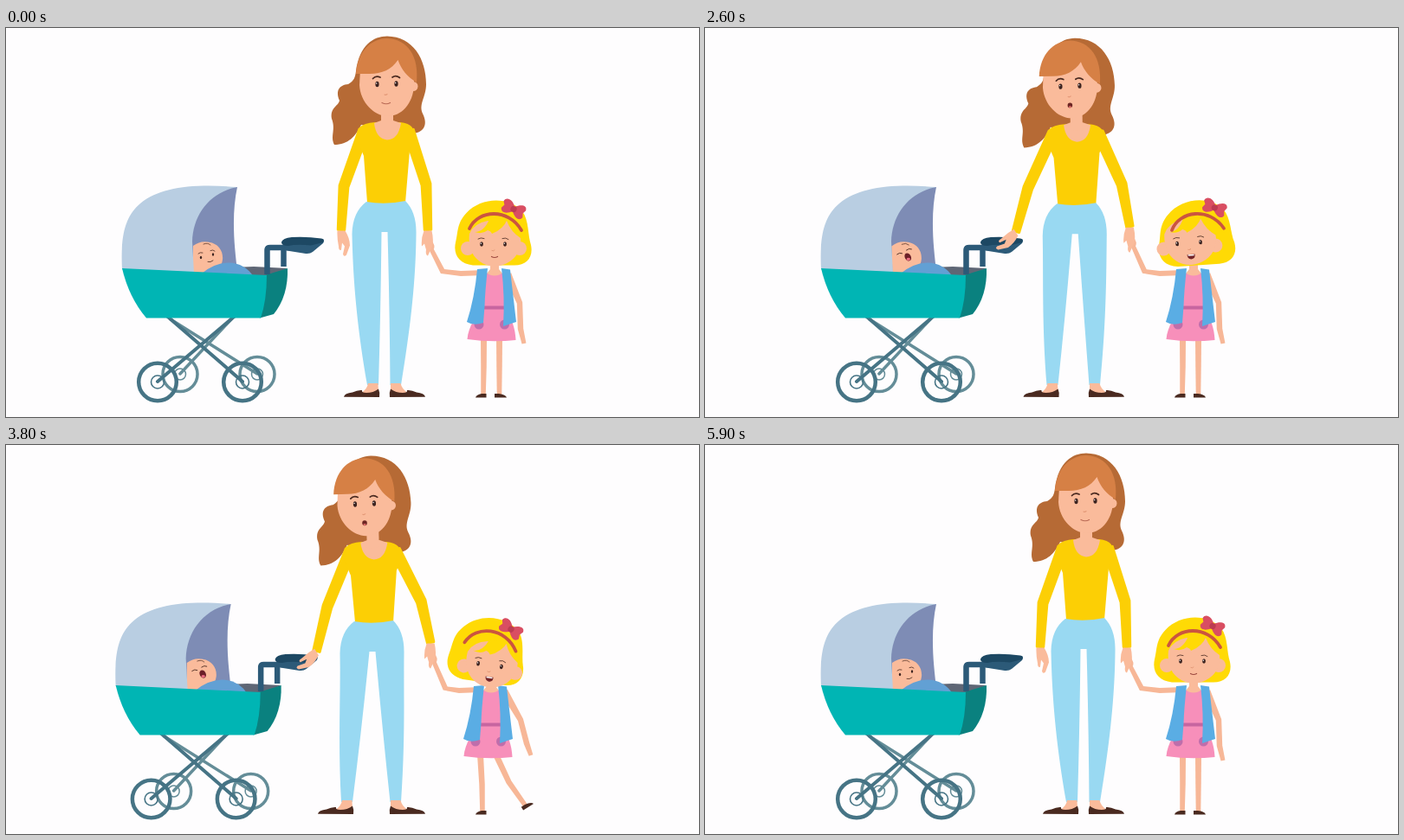
An HTML page for the animation above (6 s loop, 800x450 px).

```html
<!DOCTYPE html>
<html lang="en">
<head>
<meta charset="utf-8">
<title>Mother with pram and daughter</title>
<style>
html, body { margin: 0; width: 100%; height: 100%; overflow: hidden; background: #fefdfe; }
svg { display: block; width: 100%; height: 100%; }
.line { fill: none; stroke-linecap: round; stroke-linejoin: round; }
.skin { fill: #fabb9b; }
.shirt { fill: #fccf05; }
.sleeve { fill: #fccf05; stroke: #fccf05; stroke-width: 3; stroke-linejoin: round; }
.denim { fill: #99d9f2; }
.blonde { fill: #ffda05; }
.shoe { fill: #4a2a20; }
.ink { fill: #3b2320; }
.pen { stroke: #4a2a20; }
.steel { stroke: #467485; }
.far { stroke: #648d98; }
</style>
</head>
<body>
<svg viewBox="0 0 800 450" preserveAspectRatio="xMidYMid meet">
  <rect width="800" height="450" fill="#fefdfe"/>

  <g id="pram">
    <g class="line far" stroke-width="3.5">
      <path d="M190 337L290 400M260 337L201 400"/>
      <circle cx="201" cy="400.500" r="20"/><circle cx="290" cy="400.500" r="20"/>
      <g stroke-width="1.500"><circle cx="201" cy="400.500" r="6.500"/><circle cx="290" cy="400.500" r="6.500"/></g>
    </g>
    <g class="line steel" stroke-width="4">
      <path d="M181 329L273 409M269 329L175 409"/>
      <circle cx="175" cy="409.500" r="21.800" stroke-width="4.500"/><circle cx="273" cy="409.500" r="21.800" stroke-width="4.500"/>
      <g stroke-width="1.600"><circle cx="175" cy="409.500" r="7.500"/><circle cx="273" cy="409.500" r="7.500"/></g>
    </g>
    <path fill="#7e8cb5" d="M267 184C261 212 262 245 268 288H212V215Q230 184 267 184Z"/>
    <path fill="#5e6675" d="M262 277L286 276L325 278L301 288H262Z"/>
    <g id="baby">
      <path class="skin" d="M216 252Q224 246 233 247.500C246 249 251 259 250 268C249 277 242 284 230 284H216Z"/>
      <path class="line pen" stroke-width=".7" d="M228 250Q233 248 236 251"/>
      <g id="calm">
        <ellipse class="ink" cx="225" cy="265.500" rx="1.200" ry="1.800"/>
        <ellipse class="ink" cx="239" cy="262" rx="1.200" ry="1.800"/>
        <path class="line pen" stroke-width=".8" d="M222 261Q224 259 227 260M236 257.500Q239 256 241 258M233 270.500Q236 271.500 239 269"/>
      </g>
      <g id="cry">
        <path class="line pen" stroke-width=".9" d="M222 261.500Q225 259 228 260.500M233 257Q236 254.500 239 256"/>
        <ellipse cx="234.500" cy="265" rx="3.500" ry="4.800" fill="#6c1f27" transform="rotate(-28 234.500 265)"/>
        <ellipse cx="235" cy="267.500" rx="2.200" ry="1.600" fill="#ed6d83"/>
      </g>
    </g>
    <path fill="#62a0d4" d="M226 284Q240 272 257 271.500Q276 272 286 288H226Z"/>
    <path fill="#b9cee2" d="M134 279C132 238 138 218 155 203C178 184 216 180 267 184C235 190 216 216 215 247L217 284Z"/>
    <path fill="#0a817f" d="M299 286L325 278Q326 310 309 331L293 335.500Z"/>
    <path fill="#00b5b4" d="M134 278L301 286Q301 315 294 335.500H162Q142 312 134 278Z"/>
    <g class="line" stroke="#2c5a78" stroke-width="6.500" style="stroke-linecap: butt">
      <path d="M320.500 276V254"/>
      <path d="M301.500 285V257Q301.500 254 305 254H327"/>
    </g>
    <path fill="#2c5a78" d="M318 247L366 244Q368 246 366 249L354 259Q351 261.500 346 261L324 257.500Z"/>
    <path fill="#1d4863" d="M318 248Q319 243 330 242Q347 241 364 243.500Q368 244 366 248L352 251.500Q335 250 326 252Q318 252 318 248Z"/>
  </g>

  <g id="mum">
    <g id="backHair"><path fill="#b66a35" d="M404 50C408 20 424 9.500 440 9.500C470 10 485 36 485 65C485 80 476 88 481 99C488 113 481 121 470 122L410 112C404 125 395 135 379 135C374 125 381 118 376 105C374 92 383 91 385 84C380 72 385 66 395 65C402 61 403 57 404 50Z"/></g>
    <path class="sleeve" id="armL"/>
    <path class="sleeve" id="armR"/>
    <g id="torso">
      <path class="shirt" d="M426 109Q413 110 408 115L405 128L413 148L417 202Q438 206 461 202L466 142L473 127L469 115Q465 110 455 109Z"/>
      <path class="skin" d="M425 110L433 107H447L456 110Q453 129 440 129.500Q427 128 425 110Z"/>
    </g>
    <path class="denim" id="legs"/>
    <g id="footL">
      <path class="skin" d="M418 411H429.500L430 422H410Q417 418 418 411Z"/>
      <path class="shoe" d="M390 426.800Q391 422.500 400 421.500Q406 418.500 411 419Q410 422 416 422Q424 422 430 417.500Q432 422 431 427Z"/>
    </g>
    <g>
      <path class="skin" d="M444 411H455.500Q457 418 464 422H444Z"/>
      <path class="shoe" d="M484 426.800Q483 422.500 474 421.500Q468 418.500 463 419Q464 422 458 422Q450 422 444 417.500Q442 422 443 427Z"/>
    </g>
    <g id="head">
      <path class="skin" d="M433 90H447V116H433Z"/>
      <g id="turn">
        <circle class="skin" cx="470" cy="67.500" r="5.500"/>
        <path class="skin" d="M409 48L440 34H468L471 60V66C470 88 456 102 441 102C425 102 409 86 408 66Z"/>
        <path fill="#d68045" d="M404 53C406 27 421 12.500 440 12C464 13 477 33 474 63C464 57 456 48 452.500 37C445 48 434 53 420 53Z"/>
        <path class="line pen" stroke-width="1.700" d="M423.500 58.500Q427 54.500 432 57M446 57Q450 54 454.500 57.500"/>
        <g id="eyes">
          <ellipse class="ink" cx="428.500" cy="65" rx="2.100" ry="3.200"/><ellipse class="ink" cx="450.500" cy="64.500" rx="2.100" ry="3.200"/>
          <circle cx="427.700" cy="64" r=".7" fill="#fff"/><circle cx="449.700" cy="63.500" r=".7" fill="#fff"/>
        </g>
        <path id="lids" class="line pen" stroke-width="1.200" d="M425.500 67Q428.500 69.500 431.500 67M447.500 66.500Q450.500 69 453.500 66.500"/>
        <path class="line" stroke="#e39978" stroke-width="1.100" d="M437 77Q438.500 78 440 76.500"/>
        <path id="smile" class="line" stroke="#b96a55" stroke-width="1.200" d="M434 86.500Q439 89 443.500 86.500"/>
        <g id="gasp"><ellipse cx="439" cy="87" rx="2.800" ry="2.900" fill="#6c2523"/><ellipse cx="439" cy="88.800" rx="1.700" ry="1" fill="#dd6a69"/></g>
      </g>
    </g>
  </g>

  <g id="girl">
    <g fill="#f7b797">
      <path id="kidArmL"/><path id="kidArmR"/>
      <path id="kidLegL"/><path id="kidLegR"/>
      <path id="kidHand" d="M-3 -2L3 -2L4 6Q3 11 0 10L-3 6L-6 5Z"/>
    </g>
    <path class="shoe" d="M542 427.500Q543 424 549 423H554.500V427.500Z"/>
    <g id="kidShoe"><path class="shoe" d="M-5 4.500V0H0Q8 1 9 4.500Z"/></g>
    <g id="frock">
      <path class="skin" d="M559 268H569V279L573 284Q564 293 555 284L559 279Z"/>
      <path fill="#f78fba" d="M553 282Q564 291 575 282L575 323C584 335 588 348 588.500 361Q560 364 532.500 360C534 345 542 334 551 323Z"/>
      <path fill="#c765a0" d="M550 321.500H575V325.500H550Z"/>
      <g fill="#bf6eab"><circle cx="546" cy="343" r="5.500"/><circle cx="575.500" cy="343" r="5.500"/></g>
      <path fill="#5aade4" d="M544 279L556 278Q553 305 552.500 322L551 341Q540 345 532 340Q541 312 544 279Z"/>
      <path fill="#5aade4" d="M572 278L582 279.500Q585 306 589 340L574 345Q576 310 572 278Z"/>
    </g>
    <g id="kidHead">
      <path class="blonde" d="M531.500 214C549 195 581 195 596 212C604 223 602 239 606 251C609 265 601 274.500 587 274.500H539C523 273 516 262 519 248C522 237 520 226 531.500 214Z"/>
      <g id="kidFace">
        <circle class="skin" cx="533" cy="255" r="8"/><circle class="skin" cx="593" cy="255" r="8"/>
        <path class="skin" d="M535 238Q540 226 556 223H578Q583 236 594 243C596 263 580 275.500 564 275.500C548 275.500 532 263 535 238Z"/>
        <path class="blonde" d="M541 236Q552 236 558 221H579Q574 233 561 238Q560 235 556 234Q550 239 541 236Z"/>
        <path class="line pen" stroke-width=".8" d="M545 244Q548 242 552 243.500M573 243.500Q577 242 580 244.500"/>
        <ellipse class="ink" cx="549" cy="250" rx="1.900" ry="2.700"/><ellipse class="ink" cx="576" cy="250" rx="1.900" ry="2.700"/>
        <circle cx="548.300" cy="249.200" r=".7" fill="#fff"/><circle cx="575.300" cy="249.200" r=".7" fill="#fff"/>
        <path class="line" stroke="#e39978" stroke-width="1" d="M561 257.500Q563 258.500 564 257"/>
        <path id="kidSmile" class="line" stroke="#9d493f" stroke-width="1.200" d="M560.500 264.500Q564 266.500 567.500 264.500"/>
        <g id="kidTalk">
          <path fill="#742529" d="M559.500 263.500H568.500Q569 269 564 269Q559.500 268.500 559.500 263.500Z"/>
          <path fill="#fff" d="M560.500 263.500H567.500V265H560.500Z"/>
        </g>
      </g>
      <path class="line" stroke="#cb553f" stroke-width="3.800" d="M535 232C545 210 580 208 595 234"/>
      <g transform="translate(586 209.500) rotate(25) scale(.9)">
        <path fill="#d94e62" d="M0 -3C-6 -11 -15 -11 -16 -4L-13 0L-15 5C-13 12 -5 9 0 3C5 9 13 12 15 5L13 0L15 -5C14 -12 6 -10 0 -3Z"/>
        <circle r="4" fill="#bd3c52"/>
      </g>
    </g>
  </g>

  <g class="skin">
    <g id="handR"><path d="M-4.500 0H4.500Q7 11 5 18L0 29Q-3 28 -2 22L-4 15L-7 18Q-8 9 -4.500 0Z"/></g>
    <g id="handL"><path d="M-4.500 0H4.500Q10 9 10 17L6 28Q3 31 2 27L4 18L1 14L0 22Q-3 24 -3 18Q-5 8 -4.500 0Z"/></g>
  </g>
</svg>
<script>
const LOOP = 6000, STEP = 100;
const el = {};
document.querySelectorAll("[id]").forEach(n => el[n.id] = n);

const mix = (a, b, u) => a + (b - a) * u;
const smooth = u => u * u * (3 - 2 * u);

// Eased value of rows [time, ...values]
function track(t, rows) {
  let i = 0;
  while (i < rows.length - 2 && t >= rows[i + 1][0]) i++;
  const a = rows[i], b = rows[i + 1];
  const u = smooth(Math.min(1, Math.max(0, (t - a[0]) / (b[0] - a[0]))));
  return a.slice(1).map((v, k) => mix(v, b[k + 1], u));
}

// Tapered outline around a chain of joints
function limb(node, pts, widths) {
  const left = [], right = [];
  pts.forEach(([x, y], i) => {
    const p = pts[Math.max(0, i - 1)], q = pts[Math.min(pts.length - 1, i + 1)];
    const dx = q[0] - p[0], dy = q[1] - p[1], k = widths[i] / 2 / Math.hypot(dx, dy);
    left.push([x - dy * k, y + dx * k]);
    right.unshift([x + dy * k, y - dx * k]);
  });
  node.setAttribute("d", "M" + left.concat(right).map(p => p.map(n => n.toFixed(2))).join("L") + "Z");
}

const move = (node, x, y, r = 0, cx = 0, cy = 0) =>
  node.setAttribute("transform", `translate(${x} ${y}) rotate(${r} ${cx} ${cy})`);
const show = (node, on) => node.setAttribute("visibility", on ? "visible" : "hidden");

const ROCK = [[2600, 0], [3120, -22], [3560, 0], [4180, -22], [4720, 0]];
const WALK = [[1980, 0], [2900, 1], [5130, 1], [5700, 0]];
const REACH = [[1980, 387, 235, 0], [2600, 359, 237, 1], [2900, 364, 240, 1], [5130, 364, 240, 1], [5700, 387, 235, 0]];
// x, y, tilt of the head, then shift of the face
const NOD = [
  [0, 0, 0, 0, 0, 0], [500, 4, 1, -2, -3, 0], [1000, 3, 2, 0, 0, 0], [1600, 6.5, 4, 0, -3, -1],
  [1750, 6.5, 4, 0, -3, -1], [2150, 4.5, 0, -4, -9, -2], [2700, 4.5, 0, -4, -9, -2],
  [3100, -1, 5, 0, -3, 1], [3350, 5, 3, -1, -3, 0], [3800, -7, 0, 8, 5, 4],
  [4300, 3, 3, 0, -2, 0], [4900, 0, 0, 0, 0, 0]
];
const KICK = [[3400, 0], [3800, 1], [4250, 0]];

function draw(t) {
  const [pram] = track(t, ROCK), [walk] = track(t, WALK);
  const push = -pram / 22, crying = t >= 900 && t < 4900;

  move(el.pram, pram, 0);
  show(el.cry, crying);
  show(el.calm, !crying);
  move(el.baby, 0, 0, crying ? 2 * Math.sin(t / 150) : 0, 233, 272);

  const hip = -13 * walk - 3 * push, chest = -14.5 * walk - 3.5 * push, drop = 3 * walk;
  const step = -30 * walk;
  const headX = -15 * walk - 4.5 * push, headY = drop + (t > 1400 && t < 2000 ? 1 : 0);
  move(el.backHair, headX, headY, -1.5 * walk, 440, 105);
  move(el.head, headX, headY, -1.5 * walk, 440, 105);
  move(el.turn, -8 * walk, 0);
  const skew = Math.atan((hip - chest) / 90) * 180 / Math.PI;
  el.torso.setAttribute("transform", `translate(${hip} ${drop + 202}) skewX(${skew}) translate(0 -202)`);

  const hx = x => x + hip, y = v => v + drop, fx = x => x + step;
  el.legs.setAttribute("d",
    `M${hx(416)} ${y(201)}Q${hx(438)} ${y(205)} ${hx(461)} ${y(200)}Q${hx(474)} ${y(213)} ${hx(473.5)} ${y(238)}` +
    `C${hx(473)} 290 ${mix(hx(468), 468, .5)} 340 456 413H443.500Q${mix(hx(443), 443, .4)} 330 ${hx(440.5)} ${y(236)}H${hx(433.5)}` +
    `Q${mix(hx(433), fx(432), .5)} 330 ${fx(430)} 413H${fx(417)}C${mix(hx(405), fx(405), .5)} 345 ${hx(400.5)} 290 ${hx(399.5)} ${y(238)}` +
    `Q${hx(400)} ${y(213)} ${hx(416)} ${y(201)}Z`);
  move(el.footL, step, 0);

  const [lx, ly, grip] = track(t, REACH), wx = lx + pram * .75 * walk;
  const sl = [413 + chest, 119 + drop], sr = [465 + chest, 119 + drop];
  const bend = mix(-10, -7, walk);
  limb(el.armL, [sl, [(sl[0] + wx) / 2 + bend, (sl[1] + ly) / 2 + 6], [wx, ly - 1.5]], [11, 10, 7.5]);
  move(el.handL, wx, ly - .5, 58 * grip);

  const rx = 487 + 4.5 * walk - 4 * push, ry = 235 - 5 * walk;
  limb(el.armR, [sr, [485 - 5 * walk - 2 * push, 181], [rx, ry - 1.5]], [11, 10, 7.5]);
  move(el.handR, rx, ry - .5);

  const blink = t >= 1600 && t < 1800, gasp = t >= 2100 && t < 4900;
  show(el.eyes, !blink);
  show(el.lids, blink);
  show(el.smile, !gasp);
  show(el.gasp, gasp);

  const [dx, dy, tilt, faceX, faceY] = track(t, NOD), [kick] = track(t, KICK);
  const lean = -4 * kick;
  move(el.kidHead, dx, dy, tilt, 562, 240);
  move(el.kidFace, faceX, faceY);
  move(el.frock, lean, 0);
  const kx = rx + 1, ky = ry + 17;
  limb(el.kidArmL, [[552 + lean, 283], [525 + lean / 2, 284], [kx + 16, 281.5], [kx + 2, ky + 2]], [6, 6, 6.5, 5]);
  move(el.kidHand, kx + 1, ky - 5, -15);
  limb(el.kidArmR, [[579 + lean, 285], [593 + kick, 318], [594 + 7 * kick, 348 - 3 * kick], [598 + 8 * kick, 365 - 6 * kick]], [9, 6.5, 6.5, 5]);
  limb(el.kidLegL, [[551.5 + lean, 358], [551.5 + lean / 2, 392], [551 - kick, 425]], [7, 6.5, 5.5]);
  limb(el.kidLegR, [[569.5 + lean, 358], [569.5 + 11 * kick, 390], [569.5 + 30 * kick, 425 - 8 * kick]], [7, 6.5, 5.5]);
  move(el.kidShoe, 569 + 30 * kick, 423 - 7 * kick, -32 * kick);
  const talk = t >= 700 && t < 5600;
  show(el.kidTalk, talk);
  show(el.kidSmile, !talk);
}

function tick() {
  draw(Math.floor(performance.now() % LOOP / STEP) * STEP);
  requestAnimationFrame(tick);
}
draw(0);
requestAnimationFrame(tick);
</script>
</body>
</html>
```
